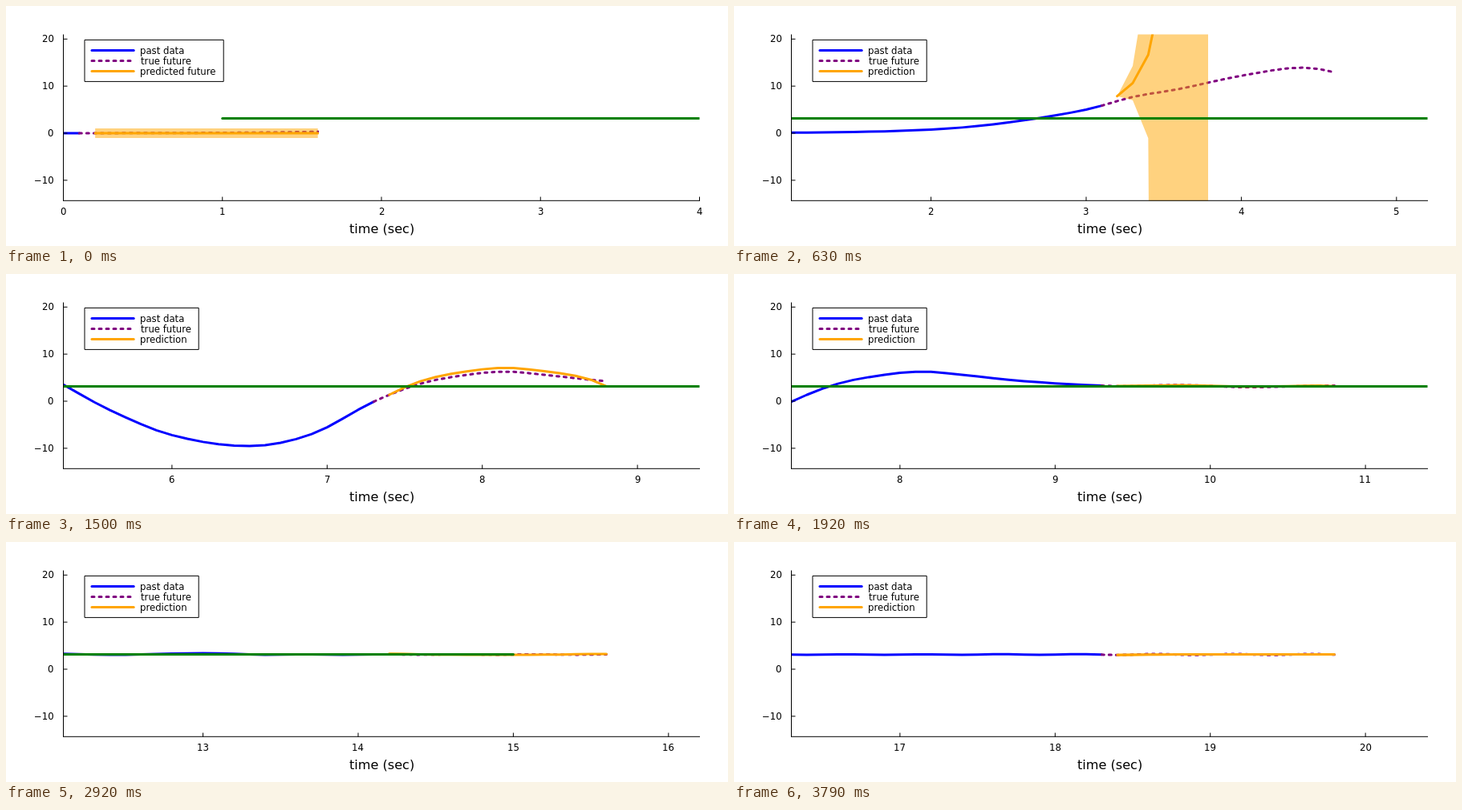
Animation of 900x300 px, one loop 3830 ms. Source, as an HTML page with a canvas:

```html
<!DOCTYPE html>
<html lang="en">
<head>
<meta charset="utf-8">
<title>Rolling prediction</title>
<style>
html, body { margin: 0; width: 100%; height: 100%; overflow: hidden; background: #fff; }
canvas { display: block; }
</style>
</head>
<body>
<canvas id="stage" width="900" height="300"></canvas>
<script>
const ctx = document.getElementById('stage').getContext('2d');
const LOOP = 3830, FPS = 24, LAST = 91, HORIZON = 14, GOAL = Math.PI;
const LEFT = 71.5, RIGHT = 864.5, TOP = 35.5, BOTTOM = 243.5;
const FONT = '"DejaVu Sans", sans-serif';
const DASH = [3, 6];

// Key points (seconds, value) of the swing between the slow start and the rest.
const KEYS = [
  [2, 0.78], [2.5, 2.3], [3, 5], [3.3, 7.7], [3.6, 9.4], [4, 12.2], [4.4, 13.94],
  [4.7, 12.1], [5, 9], [5.3, 3.5], [5.6, -1.88], [6, -7.2], [6.5, -9.53],
  [6.9, -7], [7.3, -0.1], [7.6, 3.72], [7.9, 5.6], [8.15, 6.3], [8.4, 5.6],
  [8.8, 4.25], [9.4, 3.2], [9.8, 3.45], [10.2, 3], [10.6, 3.2]
];

const bell = (x, centre, width) => Math.exp(-(((x - centre) / width) ** 2));
const clamp = (v, lo, hi) => Math.min(hi, Math.max(lo, v));
const wave = (t, peak, period) => Math.cos(2 * Math.PI * (t - peak) / period);

// Smooth curve through the key points, valid between the second and last but one.
function spline(t) {
  const i = KEYS.findIndex(key => key[0] > t) - 1;
  const slope = j => (KEYS[j + 1][1] - KEYS[j - 1][1]) / (KEYS[j + 1][0] - KEYS[j - 1][0]);
  const [t0, a] = KEYS[i], [t1, b] = KEYS[i + 1];
  const h = t1 - t0, u = (t - t0) / h, ease = u * u * (3 - 2 * u);
  return a + (b - a) * ease
    + h * u * (1 - u) * (slope(i) * (1 - u) - slope(i + 1) * u);
}

// Signal value at n tenths of a second.
function signal(n) {
  const t = n / 10;
  if (t < 2.5) return 0.78 * Math.exp(2.2 * (t - 2));
  if (t < 10.2) return spline(t);
  if (t < 13.4) return GOAL + 0.1 * bell(t, 12.6, 0.6) + 0.18 * wave(t, 10.8, 1.1);
  return GOAL - 0.02 + (0.05 + 0.07 * clamp(t - 17.5, 0, 1)) * wave(t, 15.15, 0.5);
}

// How unstable the model is at a given step; peaks at step 15.
const instability = step => step <= 15 ? (step / 15) ** 4 : 0.45 ** (step - 15);

function forecast(step, first, k) {
  const truth = signal(first + k), w = instability(step);
  if (step < 5) return truth * step / 5;
  const missedTurn = 21.5 * (1 - Math.exp(-((k / 9.5) ** 3)));
  const missedRebound = 0.8 * (1 - Math.exp(-k / 2)) - 1.9 * (k / 14) ** 12;
  let mean = truth + 1.04 * w * Math.exp(1.04 * w * k)
    + missedTurn * bell(step, 22, 2.2) + missedRebound * bell(step, 36, 8);
  const settled = clamp((step - 44) / 6, 0, 1), calm = clamp((step - 66) / 8, 0, 1);
  const ripple = GOAL - 0.13 + 0.33 * ((1 + wave(k, 0, 13.5)) / 2) ** 4;
  const flat = GOAL + (signal(first) - GOAL) * Math.exp(-k / 2);
  mean += settled * (ripple - mean);
  return mean + calm * (flat - mean);
}

function spread(step, k) {
  const x = k * instability(step);
  const growth = x < 1 ? 3.65 * x
    : Math.exp(1.295 + 1.58 * (x - 1) + 0.88 * (x - 1) * (x - 2));
  const hump = k < 6 ? 0.45 * Math.sin(Math.PI * k / 6) * bell(step, 22, 2.2) : 0;
  const late = step > 66 ? Math.max(0, 0.3 - 0.02 * k) : 0;
  return Math.max(0, 1 - step / 15) + growth + hump + late;
}

const yPos = v => 159 - 5.885 * clamp(v, -3000, 3000);

function stroke(points, color, width = 3, dash = []) {
  ctx.beginPath();
  points.forEach(([x, y]) => ctx.lineTo(x, y));
  ctx.strokeStyle = color;
  ctx.lineWidth = width;
  ctx.lineJoin = 'round';
  ctx.lineCap = width > 1 ? 'round' : 'butt';
  ctx.setLineDash(dash);
  ctx.stroke();
}

// Aligns the visible ink of the text, on whole pixels; align runs from 0 (left) to 1 (right).
function text(str, x, y, align = 0, size = 11.7) {
  ctx.font = size + 'px ' + FONT;
  ctx.fillStyle = '#000';
  const box = ctx.measureText(str);
  const inkLeft = -box.actualBoundingBoxLeft, inkRight = box.actualBoundingBoxRight;
  ctx.fillText(str, Math.round(x - inkLeft - (inkRight - inkLeft) * align), Math.floor(y));
}

function drawLegend(step) {
  const label = step ? 'prediction' : 'predicted future';
  const width = step ? 142.2 : 173.2;
  ctx.fillStyle = '#fff';
  ctx.fillRect(98, 42.4, width, 52);
  ctx.setLineDash([]);
  ctx.lineWidth = 1;
  ctx.strokeStyle = '#000';
  ctx.strokeRect(98, 42.4, width, 52);
  [['past data', 'blue'], ['true future', 'purple', DASH], [label, 'orange']]
    .forEach(([name, color, dash], row) => {
      const y = 55.5 + 13 * row;
      stroke([[107, y], [159.2, y]], color, 3, dash);
      text(name, 168, y + 4.5);
    });
}

function drawAxes(start, end, xPos) {
  stroke([[LEFT, TOP], [LEFT, BOTTOM]], '#000', 1);
  stroke([[LEFT - 0.5, BOTTOM - 0.2], [RIGHT + 0.5, BOTTOM - 0.2]], '#000', 1);
  for (let v = -10; v <= 20; v += 10) {
    const y = yPos(v);
    stroke([[LEFT, y], [LEFT + 5, y]], '#000', 1);
    text(String(v).replace('-', '\u2212'), 59, y + 4.5, 1);
  }
  for (let n = Math.ceil(start / 10) * 10; n <= end; n += 10) {
    const x = xPos(n);
    stroke([[x, BOTTOM], [x, BOTTOM - 5]], '#000', 1);
    text(String(n / 10), x, 261, 0.5);
  }
  text('time (sec)', 468, 284, 0.5, 16.1);
}

function draw(step) {
  const now = 1 + 2 * step, first = now + 1;
  const start = Math.max(0, now - 20), end = Math.max(40, now + 21);
  const xPos = n => LEFT + (n - start) / (end - start) * (RIGHT - LEFT);
  const trace = (a, b) => Array.from({ length: b - a + 1 },
    (_, j) => [xPos(a + j), yPos(signal(a + j))]);

  ctx.fillStyle = '#fff';
  ctx.fillRect(0, 0, 900, 300);
  ctx.save();
  ctx.beginPath();
  ctx.rect(LEFT, TOP, RIGHT - LEFT, BOTTOM - TOP);
  ctx.clip();

  stroke(trace(start, now), 'blue');
  stroke(trace(now, now + 15), 'purple', 3, DASH);

  // The band is cut off where its width runs away.
  const cut = Math.min(HORIZON, 5.86 / Math.max(instability(step), 0.01));
  const mean = [], upper = [], lower = [];
  for (let k = 0; k <= HORIZON; k++) {
    const m = forecast(step, first, k), s = spread(step, k);
    mean.push([xPos(first + k), yPos(m)]);
    if (k < cut + 1) {
      const x = xPos(first + Math.min(k, cut));
      upper.push([x, yPos(m + s)]);
      lower.unshift([x, yPos(m - s)]);
    }
  }
  ctx.beginPath();
  upper.concat(lower).forEach(([x, y]) => ctx.lineTo(x, y));
  ctx.fillStyle = 'rgba(255, 165, 0, 0.5)';
  ctx.fill();
  stroke(mean, 'orange');
  stroke([[xPos(10), yPos(GOAL)], [xPos(150), yPos(GOAL)]], 'green');
  ctx.restore();

  drawAxes(start, end, xPos);
  drawLegend(step);
}

const origin = performance.now();
function tick() {
  const t = Math.floor(((performance.now() - origin) % LOOP) / 10) * 10;
  draw(Math.min(LAST, Math.floor((t + 4.9) * FPS / 1000)));
  requestAnimationFrame(tick);
}
tick();
</script>
</body>
</html>
```
